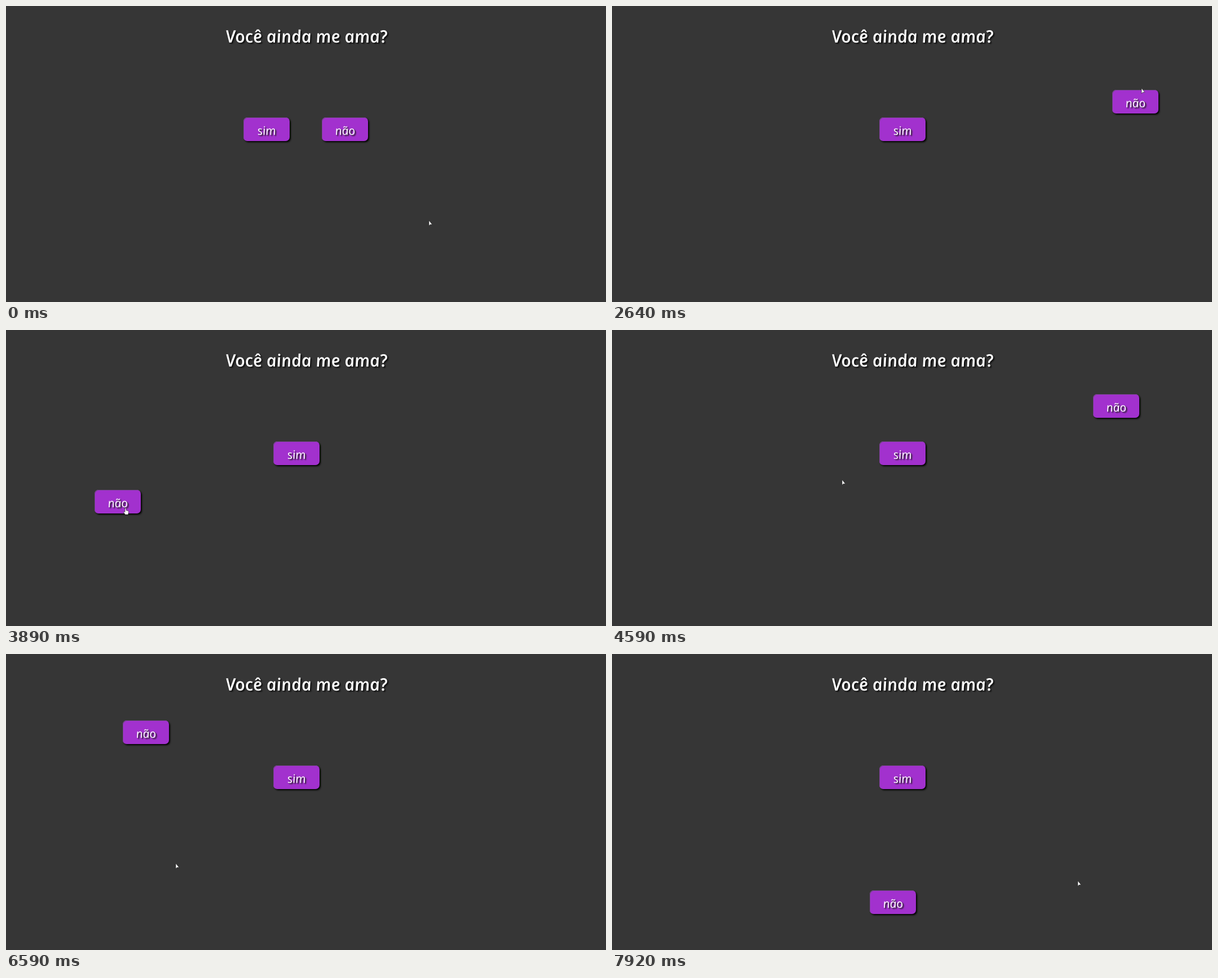
Write an HTML page that moves like this. It is 1064 px wide and 526 px high and loops after 7990 ms.

```html
<!DOCTYPE html>
<html lang="pt-BR">
<head>
<meta charset="utf-8">
<title>Você ainda me ama?</title>
<style>
  html, body { margin: 0; width: 100%; height: 100%; overflow: hidden; background: #363636; }
  body { position: relative; color: #fff; font-family: "Open Sans", "Noto Sans", sans-serif; font-style: italic; }
  /* Cursive letterforms, set nearly upright. */
  h1, .button span { display: block; transform: skewX(9deg); }
  h1 {
    margin: 0; width: 1065px; text-align: center;
    font-size: 30.5px; font-weight: 600; line-height: 106px;
    text-shadow: 2px 2px 2px #111;
  }
  .button, svg { position: absolute; left: 0; top: 0; }
  .button {
    width: 82px; height: 42px; border-radius: 7px;
    background: #a231ce;
    box-shadow: inset 1px 1px 0 #74458a, 2px 2px 3px #000;
    text-align: center; font-size: 21px; line-height: 46px;
    text-shadow: 2px 2px 2px #222;
  }
  svg { overflow: visible; fill: #fff; stroke: #1c1c1c; stroke-width: .6; }
</style>
</head>
<body>
<h1>Você ainda me ama?</h1>
<div class="button" id="yes"><span>sim</span></div>
<div class="button" id="no"><span>não</span></div>
<svg id="cursor" width="14" height="16">
  <path id="arrow" d="M0 0V9.6L2.3 7.3H5.9Z"/>
  <path id="hand" d="M-1 1Q0-.6 1 1V4.4L4.6 5.4Q5.8 6 5.4 8L4.6 12H-.6L-3.4 8Q-3.6 6.4-2 6.8L-1 7.6Z"/>
</svg>
<script>
const LOOP = 7990, STILL = 1260, STEP = 69.375, GLIDE = 500;
const WIDTH = 82, HEIGHT = 42, TOP = 114, BOTTOM = 449;

// Where "não" flees to, and when.
const home = { x: 560, y: 198 };
const hops = [
  { at: 1631, x: 911, y: TOP },
  { at: 2588, x: 689, y: BOTTOM },
  { at: 3255, x: 157, y: 284 },
  { at: 3995, x: 853, y: TOP },
  { at: 5133, x: 263, y: BOTTOM },
  { at: 6168, x: 206, y: TOP },
  { at: 7006, x: 798, y: 393 },
  { at: 7773, x: 83, y: BOTTOM }
];

const [yes, no, cursor, arrow, hand] =
  ["yes", "no", "cursor", "arrow", "hand"].map(id => document.getElementById(id));

const clamp = (v, low = 0, high = 1) => Math.min(high, Math.max(low, v));
const mix = (a, b, k) => a + (b - a) * k;
const between = (a, b, k) => ({ x: mix(a.x, b.x, k), y: mix(a.y, b.y, k) });
const smooth = p => p * p * (3 - 2 * p);
const place = (el, { x, y }) => {
  el.style.transform = `translate(${Math.round(x)}px, ${Math.round(y)}px)`;
};

// The CSS "ease" curve, cubic-bezier(.25, .1, .25, 1).
function ease(p) {
  let low = 0, high = 1, s = .5;
  for (let i = 0; i < 20; i++) {
    if (.75 * s * (1 - s) + s ** 3 < p) low = s; else high = s;
    s = (low + high) / 2;
  }
  return .3 * (1 - s) ** 2 * s + 3 * (1 - s) * s * s + s ** 3;
}

const glide = (t, start) => ease(clamp((t - start) / GLIDE));
const noAt = t => hops.reduce((spot, hop) => between(spot, hop, glide(t, hop.at)), home);

// The pointer chases the button: it waits, then runs to the near side of the resting place.
function pointerAt(t) {
  let spot = { x: 750, y: 381 }, leftAt = 1077, rest = home;
  for (const hop of hops) {
    const touch = {
      x: clamp(spot.x, rest.x + 28, rest.x + WIDTH - 28),
      y: clamp(spot.y, rest.y + 10, rest.y + HEIGHT - 10)
    };
    const elapsed = (t - leftAt) / (hop.at - leftAt);
    if (elapsed < 1) return between(spot, touch, smooth(clamp((elapsed - .32) / .55)));
    spot = touch;
    leftAt = hop.at;
    rest = hop;
  }
  return spot;
}

// The picture holds between steps, like a screen recording.
function held(t) {
  return t < STILL ? 0 : STILL - 6 + Math.floor((t - STILL + 13) / STEP) * STEP;
}

function draw(now) {
  const t = held(now % LOOP);
  const button = noAt(t), pointer = pointerAt(t);
  const dx = pointer.x - button.x, dy = pointer.y - button.y;
  const hover = dx >= 0 && dx <= WIDTH && dy >= 0 && dy <= HEIGHT;
  place(yes, { x: mix(421, 474, glide(t, hops[0].at)), y: home.y });
  place(no, button);
  place(cursor, pointer);
  arrow.style.display = hover ? "none" : "";
  hand.style.display = hover ? "" : "none";
}

const begin = performance.now();
function tick() {
  draw(performance.now() - begin);
  requestAnimationFrame(tick);
}
tick();
</script>
</body>
</html>
```
